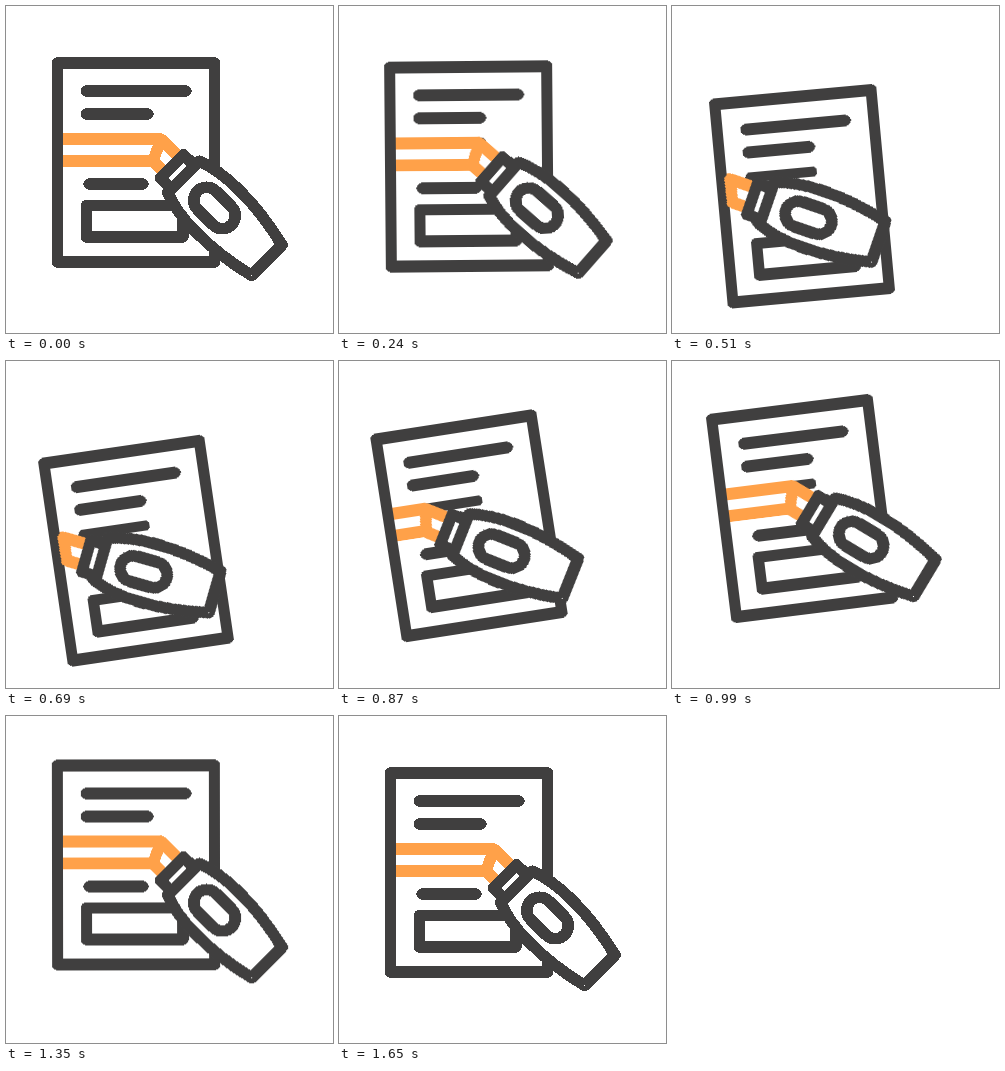
Recreate the animation shown at these times as an HTML page. Size 327x327 px, loop 1.8 s.

```html
<!DOCTYPE html>
<html lang="en">
<head>
<meta charset="utf-8">
<title>Highlighter</title>
<style>
  html, body { margin: 0; width: 100%; height: 100%; overflow: hidden; background: #fff; }
  svg { display: block; width: 100vw; height: 100vh; shape-rendering: crispEdges; }

  .ink, .glow { stroke-width: 11.5; stroke-linecap: round; stroke-linejoin: round; fill: none; }
  .ink { stroke: #403f3f; }
  .glow { stroke: #ffa149; }
  .solid { fill: #fff; }
  .thin { stroke-width: 10.5; }

  .bob, .tilt, .slide, .turn {
    animation: 1800ms cubic-bezier(.333, 0, .667, 1) infinite;
  }
  .bob { animation-name: bob; }
  .tilt { animation-name: tilt; transform-origin: 130px 156.5px; }
  .slide { animation-name: slide; --reach: -95px; }
  .slide.low { --reach: -87px; }
  .turn { animation-name: turn; transform-origin: 155px 133px; }

  @keyframes bob {
    0%, 8.9% { transform: translateY(0); }
    30.3%, 36.1% { transform: translateY(34.5px); }
    58.9%, 65% { transform: translateY(-12.5px); }
    88.3%, 100% { transform: translateY(0); }
  }
  @keyframes tilt {
    0%, 8.3% { transform: rotate(0deg); }
    44.4%, 46.1% { transform: rotate(-9deg); }
    76.7%, 100% { transform: rotate(0deg); }
  }
  @keyframes slide {
    0%, 8.9% { transform: translateX(0); }
    26.9%, 38.3% { transform: translateX(var(--reach)); }
    65.6%, 100% { transform: translateX(0); }
  }
  @keyframes turn {
    0%, 8.9% { transform: rotate(0deg); }
    26.9%, 38.3% { transform: rotate(-20.8deg); }
    65.6%, 100% { transform: rotate(0deg); }
  }
</style>
</head>
<body>
<svg viewBox="0 0 327 327">
  <defs>
    <clipPath id="page"><rect x="52" y="57" width="157" height="199"/></clipPath>
  </defs>
  <g class="bob">
    <g class="tilt">
      <!-- text lines and box -->
      <path class="ink" d="M80.5 85H180M80.5 108H142M83 178H137"/>
      <path class="ink thin" d="M80.5 133H142"/>
      <rect class="ink" x="80.5" y="199.5" width="96.5" height="31.5"/>

      <!-- marker strokes -->
      <g clip-path="url(#page)">
        <path class="glow slide" d="M-60 133H155"/>
        <path class="glow slide low" d="M-60 155H147"/>
      </g>
      <rect class="ink" x="51.5" y="57" width="157" height="199"/>

      <!-- pen -->
      <g class="slide">
        <g class="turn">
          <path class="glow solid" d="M172 150L155 133L147 155L158 166"/>
          <path class="ink solid" d="M188.5 159.5L177.5 148.7L154.5 172L165.5 182.5"/>
          <path class="ink solid" d="M193.3 155.3C216 165 247 192 276 239L245.5 269.5C198.5 240.5 171.5 209.5 161.8 186.8Z"/>
          <rect class="ink" x="-24" y="-13" width="48" height="26" rx="13" transform="translate(208.5 202) rotate(45)"/>
        </g>
      </g>
    </g>
  </g>
</svg>
</body>
</html>
```
